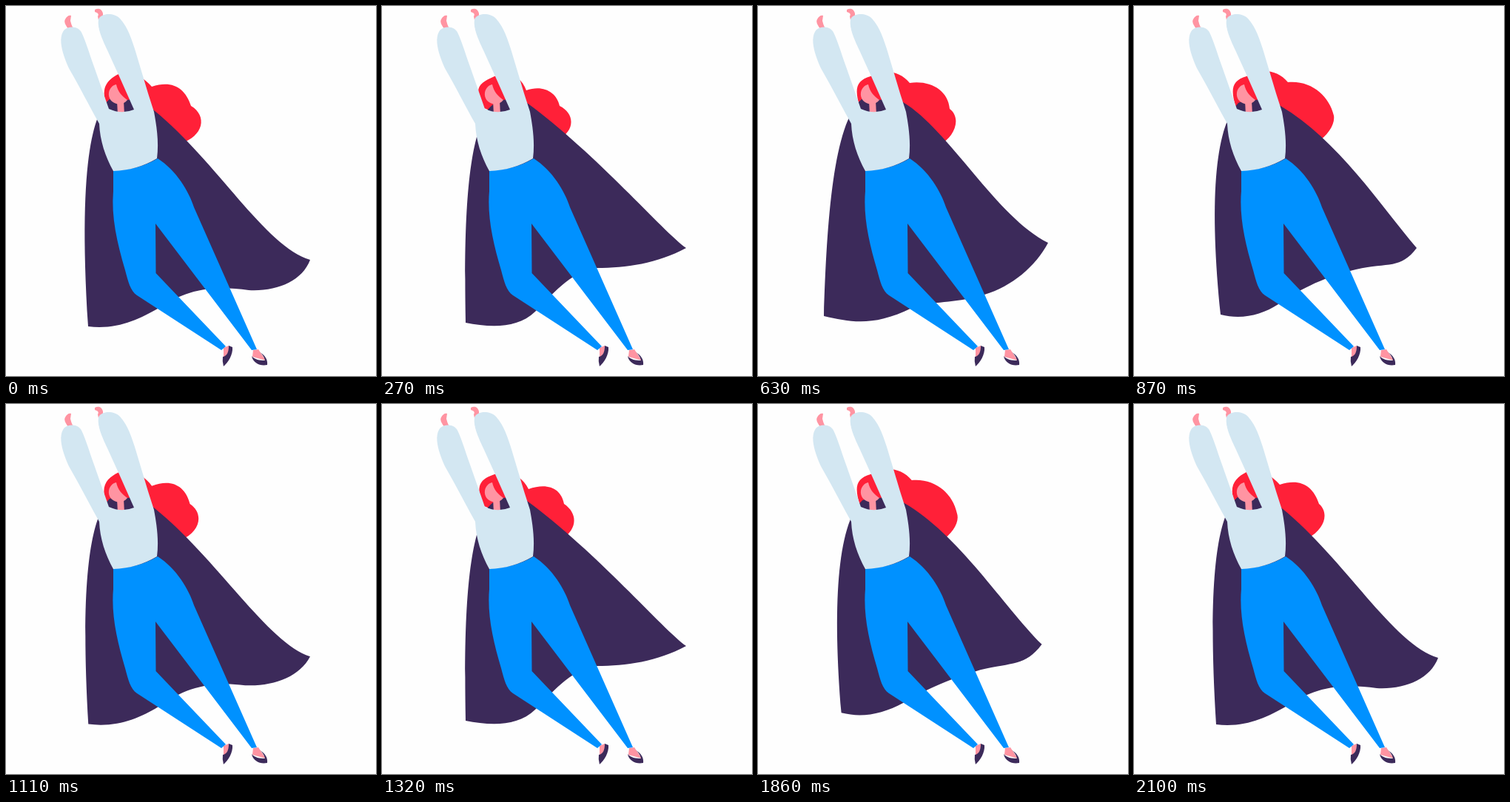
These frames come from a looping animation (500 px wide and 500 px high, 2160 ms). An HTML page:

```html
<!DOCTYPE html>
<html lang="en">
<head>
<meta charset="utf-8">
<title>Flying heroine</title>
<style>
  html, body { margin: 0; width: 100%; height: 100%; overflow: hidden; background: #fefefe; }
  svg { display: block; width: 100vw; height: 100vh; }
  .hair { fill: #ff2038; }
  .dark { fill: #3c2a5a; }
  .skin { fill: #ff94a2; }
  .shirt { fill: #d3e7f2; }
  .pants { fill: #0091ff; }
</style>
</head>
<body>
<svg viewBox="0 0 500 500">
  <path id="hair" class="hair"/>
  <path id="cape" class="dark"/>

  <!-- head and hands -->
  <path class="skin" d="M150 128 L159 128 L160 147 L151 147 Z"/>
  <path class="hair" d="M149 106 L160 104 L170 126 L164 127 L150 118 Z"/>
  <path class="skin" d="M149 106 C151 116 157 122 164 127 C160 132 154 134 149 132 C142 130 138 124 139 117 C140 111 144 107 149 106 Z"/>
  <path class="skin" d="M84 31 C80 25 78 21 80 18 C82 14 85 12 88 13 L87 20 Q88 25 91 31 Z"/>
  <path class="skin" d="M120 5 C124 3 129 3 131 10 L131 15 L125 19 L124 14 C126 11 124 9 120 8 Z"/>

  <!-- feet -->
  <path class="skin" d="M294 462 L301 459 Q302 470 294 477 Z"/>
  <path class="dark" d="M301 459 L306 461 C307 471 300 482 294 487 Q292 480 293 474 C299 473 301 467 301 459 Z"/>
  <path class="skin" d="M334 465 L341 464 L351 479 L333 474 Z"/>
  <path class="dark" d="M332 473 C336 478 343 479 350 479 C349 474 346 470 343 468 C350 472 354 478 353 485 C344 487 334 483 332 473 Z"/>

  <path class="pants" d="M145 222 Q178 222 205 206 C230 222 247 250 254 272 L339 464 L332 465 L202 294 L202.500 361 L297 460 L291 465 L177 391 C168 385 165 372 161 357 C150 320 142 285 145 250 Z"/>
  <path class="shirt" d="M79 32 C86 26 97 28 101 34 C105 40 112 62 119 82 L139 139 Q156 147 173 140 L153 95 L138 62 C130 45 123 30 125 18 C129 9 146 9 154 17 C165 29 170 46 174 58 L192 118 L200 143 C203 160 207 182 204 206 Q177 222 145 223 C134 203 127 182 126 159 C113 136 100 110 86 86 C77 67 69 43 79 32 Z"/>
</svg>
<script>
const LOOP = 2160, STEP = 30, CYCLE = 1050;

// Each pose: time in ms, then the start point and cubic segments of a closed outline.
const pose = (t, d) => ({ t, v: d.match(/[\d.]+/g).map(Number) });

const capeRest = "140 126 C122 140 96 195 111 433 C150 438 180 423 205 409 C235 390 265 375 328 384 C366 386 400 372 411 343 C350 325 285 210 200 141 C182 126 160 122 140 126";
const cape = [
  pose(0, capeRest),
  pose(270, "143 140 C118 180 110 270 113 428 C145 434 182 437 207 413 C229 392 252 360 290 354 C330 354 372 348 411 327 C380 305 290 200 196 131 C180 120 158 122 143 140"),
  pose(600, "140 126 C99 159 92 289 89 418 C130 428 165 440 208 411 C240 394 270 400 308 397 C350 390 388 362 392 319 C317 288 256 165 196 129 C175 120 158 122 140 126"),
  pose(630, "140 126 C102 159 93 289 89 419 C125 427 155 434 208 408 C245 397 270 402 306 390 C343 379 375 352 392 320 C322 285 258 167 196 130 C175 120 158 122 140 126"),
  pose(870, "141 131 C108 165 102 270 117 417 C145 424 172 418 195 403 C220 386 250 368 300 356 C345 346 360 356 382 327 C335 272 275 180 198 135 C180 122 158 122 141 131"),
  pose(CYCLE, capeRest)
];

const low = "138 138 C126 112 136 100 152 92 C170 86 188 98 197 109 C224 100 242 110 250 135 ";
const crown = "138 138 C130 112 132 101 152 95 ";
const full = crown + "C170 83 194 86 208 103 C240 100 264 122 270 148 C272 160 262 174 248 184";
const hair = [
  pose(0, low + "C272 148 268 176 235 186"),
  pose(270, "138 138 C122 110 132 104 152 95 C172 88 188 95 195 114 C217 106 236 116 240 135 C262 146 260 170 238 180"),
  pose(630, crown + "C170 84 192 88 205 104 C233 100 257 114 259 139 C276 152 265 178 245 188"),
  pose(870, full),
  pose(1050, low + "C268 147 264 173 235 184"),
  pose(1320, "138 138 C124 110 134 101 152 95 C172 88 190 98 198 115 C224 106 242 114 246 135 C264 147 265 168 244 182"),
  pose(1650, crown + "C170 84 192 88 205 103 C233 100 255 115 257 140 C275 152 268 176 245 188"),
  pose(1920, full),
  pose(2100, low + "C263 146 260 168 234 182")
];

// Smooth slope at pose k that never overshoots its neighbours.
function slope(poses, k, i) {
  const a = poses[k - 1], b = poses[k], c = poses[k + 1];
  if (!a || !c) return 0;
  const p = (b.v[i] - a.v[i]) / (b.t - a.t);
  const q = (c.v[i] - b.v[i]) / (c.t - b.t);
  return p * q > 0 ? 2 * p * q / (p + q) : 0;
}

function outline(poses, t) {
  let k = 0;
  while (k < poses.length - 2 && t >= poses[k + 1].t) k++;
  const a = poses[k], b = poses[k + 1], h = b.t - a.t;
  const u = (t - a.t) / h, w = 1 - u;
  const n = a.v.map((y, i) =>
    w * w * ((1 + 2 * u) * y + u * h * slope(poses, k, i)) +
    u * u * ((3 - 2 * u) * b.v[i] - w * h * slope(poses, k + 1, i)));
  return `M${n.slice(0, 2)}C${n.slice(2)}Z`;
}

const capeEl = document.getElementById("cape");
const hairEl = document.getElementById("hair");
const start = performance.now();

function draw() {
  const now = (performance.now() - start) % LOOP;
  const t = Math.min(Math.floor(now / STEP) * STEP, 2 * CYCLE);
  capeEl.setAttribute("d", outline(cape, t % CYCLE));
  hairEl.setAttribute("d", outline(hair, t));
  requestAnimationFrame(draw);
}
draw();
</script>
</body>
</html>
```
